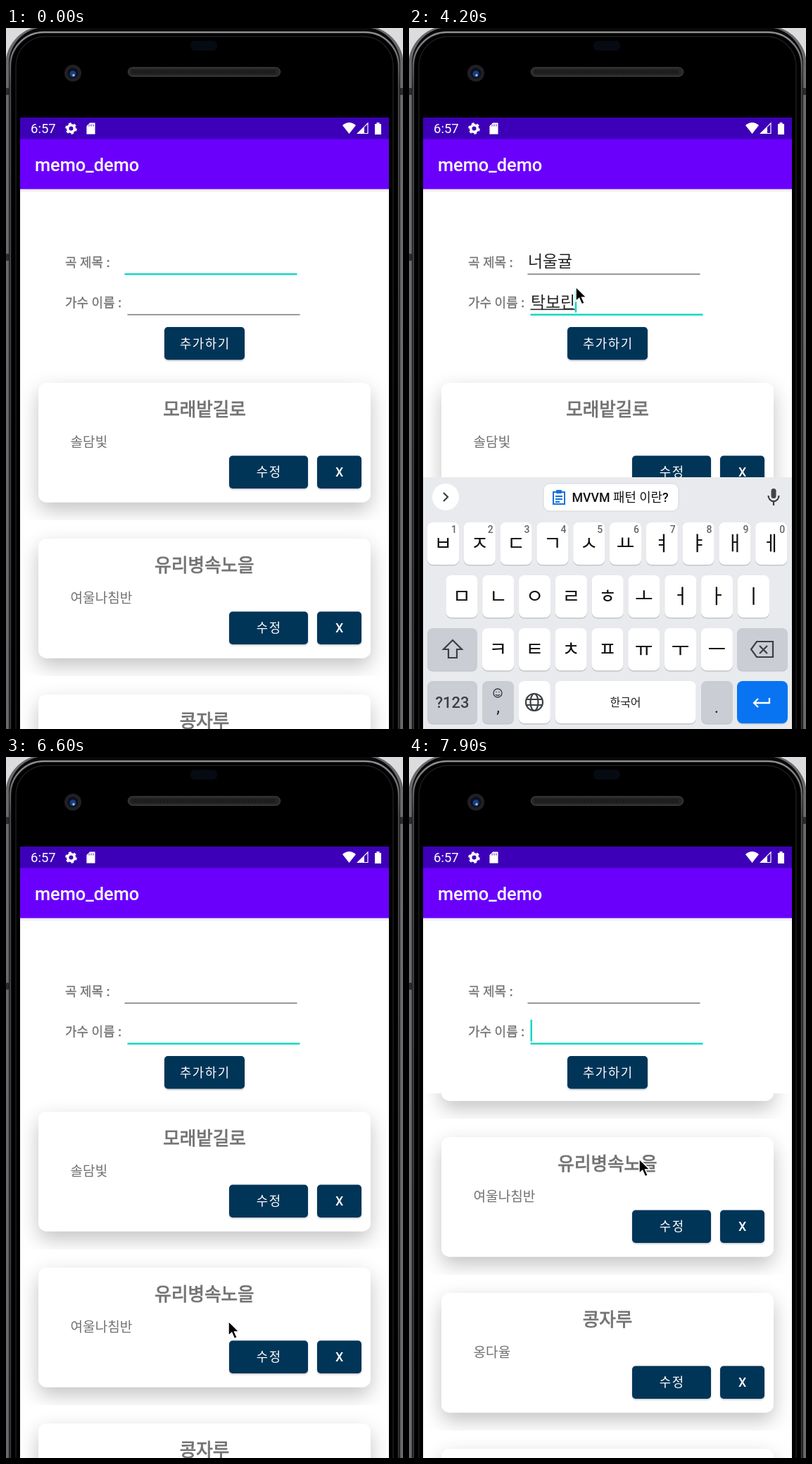
These frames come from a looping animation (564x994 px, 8000 ms). An HTML page:

```html
<!DOCTYPE html>
<html lang="ko">
<head>
<meta charset="utf-8">
<style>
html, body { margin: 0; width: 100%; height: 100%; overflow: hidden; background: #dcdcde; }
svg { display: block; }
text { font-family: Roboto, "Noto Sans CJK KR", "Noto Sans CJK", sans-serif; white-space: pre; }
.line { fill: none; stroke: #3c4043; stroke-width: 2.2; }
</style>
</head>
<body>
<svg id="stage" width="100%" height="100%" viewBox="0 0 564 994"></svg>
<script>
const LOOP = 8000, STEP = 100, ROW = 221, GLYPH = 21.07;
const NAVY = '#003459', GRAY = '#727272', TEAL = '#10d8c4';

const rect = (x, y, w, h, r, fill, more = '') =>
  `<rect x="${x}" y="${y}" width="${w}" height="${h}" rx="${r}" fill="${fill}" ${more}/>`;
// Text placed by the vertical centre of its glyphs
const text = (x, cy, size, fill, str, more = '') =>
  `<text x="${x}" y="${cy + size * .37}" font-size="${size}" fill="${fill}" ${more}>${str}</text>`;
const mid = 'text-anchor="middle"', medium = 'font-weight="500"';
const path = (d, more = 'class="line"') => `<path d="${d}" ${more}/>`;
const bold = (color, w) => `stroke="${color}" stroke-width="${w}"`;

const button = (x, y, w, h, label) =>
  rect(x, y, w, h, 5, NAVY, 'filter="url(#low)"') +
  text(x + w / 2 + .8, y + h / 2, 17.8, '#fff', label, `${mid} ${medium} letter-spacing="1.59"`);

const card = ([title, artist], i) => `<svg x="20" y="${i * ROW}" width="524" height="${ROW}">
  ${rect(0, 0, 524, ROW, 0, '#fff')}
  ${rect(26, 26, 472, 169.5, 12, '#fff', 'filter="url(#high)"')}
  ${text(262, 64, 25.6, GRAY, title, `${mid} ${bold(GRAY, .8)}`)}
  ${text(71.5, 110, 19.1, GRAY, artist)}
  ${button(297, 129.5, 112, 46.5, '수정')}${button(422, 129.5, 63, 46.5, 'X')}</svg>`;

const songs = [['모래밭길로', '솔담빛'], ['유리병속노을', '여울나침반'], ['콩자루', '옹다율'], ['너울귤', '탁보린']];

const key = (x, y, w, fill, inner = '') => rect(x, y + 1.5, w, 60, 8, '#c3c6ca') + rect(x, y, w, 60, 8, fill) + inner;
const letters = (str, x0, y, digits) => [...str].map((ch, i) => {
  const x = x0 + i * 51.8;
  return key(x, y, 45, '#fff', text(x + 22.5, y + 30, 28, '#111', ch, mid) +
    (digits ? text(x + 38, y + 10, 14, '#666', (i + 1) % 10, `${medium} ${mid}`) : ''));
}).join('');

const SOFT = '#cacdd4';
const keyboard = () => rect(20, 637, 524, 370, 0, '#e8eaed') +
  '<circle cx="52" cy="665" r="19" fill="#fff"/>' + path('M49 659l6 6-6 6') +
  `<g id="chip">${rect(191, 646, 192, 39, 9, '#fff', 'stroke="#d4d6da"')}
    ${path('M205 658h16v17h-16zM208 664h10M208 668h10M208 672h6', 'fill="none" stroke="#1470e0" stroke-width="2"')}
    ${rect(209, 655, 8, 5, 1, '#1470e0')}
    ${text(231.5, 665.5, 17.8, '#111', 'MVVM 패턴 이란?', medium)}</g>` +
  rect(514.5, 653, 7, 14, 3.5, '#444') + path('M510.500 663a7.500 8 0 0 0 15 0M518 671v6') +
  letters('ㅂㅈㄷㄱㅅㅛㅕㅑㅐㅔ', 26, 701, true) +
  letters('ㅁㄴㅇㄹㅎㅗㅓㅏㅣ', 52.5, 776) +
  letters('ㅋㅌㅊㅍㅠㅜㅡ', 104, 851) +
  key(26, 851, 71, SOFT, path('M62 868l13 13h-7v12h-12v-12h-7z')) +
  key(466, 851, 72, SOFT, path('M494 870h23v22h-23l-8-11zM498 876l11 11M509 876l-11 11')) +
  key(26, 926, 71, SOFT, text(61.5, 956, 22, '#3c4043', '?123', `${medium} ${mid}`)) +
  key(104, 926, 45, SOFT, '<circle class="line" style="stroke-width:1.4" cx="126" cy="943" r="6"/>' +
    path('M123 945q3 3 6 0M124 941v1M128 941v1', 'class="line" style="stroke-width:1.4"') +
    text(126.5, 962, 24, '#222', ',', mid)) +
  key(155.8, 926, 45, '#fff', '<circle class="line" cx="178" cy="956" r="12"/><ellipse class="line" cx="178" cy="956" rx="5.500" ry="12"/>' +
    path('M167 952h22M167 960h22')) +
  key(207.6, 926, 200, '#fff', text(307.5, 956, 16, '#222', '한국어', mid)) +
  key(415, 926, 45, SOFT, text(437, 962, 24, '#222', '.', mid)) +
  key(466, 926, 72, '#0874f2', path('M512 950v7h-21M496 951l-6 6 6 6', 'fill="none" stroke="#fff" stroke-width="2.3"'));

const field = (id, x, y) => `<path id="${id}Line" d="M${x} ${y}h245"/>` +
  text(x + .5, y - 18, 22.9, '#222', '', `id="${id}Text"`) +
  `<path id="${id}Under" stroke="#222" stroke-width="1.300"/>`;

const phone = () => rect(-1, -3, 566, 1100, 56, '#69696c') + rect(4, -1, 556, 1100, 52, '#08080a') +
  rect(6, 6, 552, 1100, 48, '#000', 'stroke="url(#rim)" stroke-width="2.500"') +
  rect(14, 12, 536, 1100, 42, '#000', 'stroke="#1d1d1f" stroke-width="1.500"') +
  [85, 320].map(y => rect(0, y, 4, 10, 1, '#2c2c2e')).join('') + rect(560, 85, 4, 10, 1, '#2c2c2e') +
  rect(262, 18, 38, 14, 6, '#060a12') +
  rect(173.5, 56, 216, 12.5, 6, '#282727', 'stroke="#4c4a48"') +
  path('M179 62.300h205', 'stroke="#111" stroke-width="6" stroke-dasharray="1 1.500"') +
  '<circle cx="95" cy="64" r="12" fill="#202024"/><circle cx="95" cy="64" r="7.500" fill="#0a1020"/>' +
  '<circle cx="95" cy="65" r="4.500" fill="#1c3f7c"/><circle cx="96" cy="67" r="1.700" fill="#9ac4f4"/>';

const bars = () => rect(20, 229, 524, 3, 0, '#f0f0f2') + rect(20, 127, 524, 31, 0, '#3d00b8') + rect(20, 157.5, 524, 71, 0, '#6a00fc') +
  text(35, 142.500, 18.5, '#fff', '6:57') +
  text(41, 194, 25.4, '#fff', 'memo_demo', medium) +
  '<circle cx="92.500" cy="142.500" r="4.800" fill="none" stroke="#fff" stroke-width="3.600"/>' +
  '<circle cx="92.500" cy="142.500" r="7" fill="none" stroke="#fff" stroke-width="2.600" stroke-dasharray="3.665"/>' +
  path('M119 134h8v17h-13v-12zM118 136.500v3M121 136.500v3M124 136.500v3', 'fill="#fff" stroke="#3d00b8" stroke-width=".9"') +
  path('M478 138q9.500-8 19 0l-9.500 12z', 'fill="#fff"') +
  path('M514 135v14.500h-14.500z', 'fill="none" stroke="#fff" stroke-width="1.200"') + path('M509 140.500v9h-9z', 'fill="#fff"') +
  path('M524 136h2.500v-2h4v2h2.500v15h-9z', 'fill="#fff"');

stage.innerHTML = `<defs>
  <filter id="high" x="-12%" y="-30%" width="124%" height="170%"><feDropShadow dx="0" dy="11" stdDeviation="14" flood-opacity=".24"/></filter>
  <filter id="low" x="-10%" y="-10%" width="120%" height="130%"><feDropShadow dx="0" dy="1.500" stdDeviation="1.200" flood-opacity=".22"/></filter>
  <linearGradient id="rim" x2="0" y2="1"><stop stop-color="#909093"/><stop offset=".07" stop-color="#444447"/><stop offset="1" stop-color="#303033"/></linearGradient>
  <clipPath id="screen">${rect(20, 127, 524, 867, 0, '#000')}</clipPath></defs>
  ${phone()}
  <g clip-path="url(#screen)">
    ${rect(20, 127, 524, 867, 0, '#fff')}
    <svg y="477" width="564" height="517"><g id="list">${songs.map(card).join('')}</g></svg>
    ${bars()}
    ${text(84, 332, 18, GRAY, '곡 제목 :', `${medium} ${bold(GRAY, .3)}`)}
    ${text(84, 389, 18, GRAY, '가수 이름 :', `${medium} ${bold(GRAY, .3)}`)}
    ${field('title', 168.5, 349)}${field('artist', 172.5, 406.5)}
    <rect id="caret" width="2.500" height="31" fill="${TEAL}"/>
    ${button(225, 424, 114, 46.5, '추가하기')}
    ${rect(225, 424, 114, 46.5, 5, '#fff', 'id="press"')}
    <circle id="glow" cx="282" r="779" fill="#6a00fc"/>
    <g id="keys">${keyboard()}</g>
  </g>
  <path id="mouse" d="M0 0v20.500l4.700-4.200 3.700 8.500 3.900-1.700-3.700-8.200h6.500z" fill="#000" stroke="#fff" stroke-width="1.500"/>`;

const el = id => document.getElementById(id);
const fade = (id, opacity) => el(id).setAttribute('opacity', +opacity);
const shift = (id, x, y) => el(id).setAttribute('transform', `translate(${x} ${y})`);

// Linear track through [time, ...values]
function at(track, t) {
  const i = track.findIndex(k => k[0] > t);
  if (i < 1) return (i ? track.at(-1) : track[0]).slice(1);
  const a = track[i - 1], b = track[i], p = (t - a[0]) / (b[0] - a[0]);
  return a.slice(1).map((v, n) => v + (b[n + 1] - v) * p);
}
const latest = (steps, t) => steps.reduce((s, [time, str]) => t >= time ? str : s, '');

const typing = {
  title: [[900, 'ㄴ'], [1100, '너'], [1300, '넝'], [1500, '너우'], [1700, '너울'], [2000, '너울ㄱ'], [2200, '너울규'], [2400, '너울귤'], [4800, '']],
  artist: [[3100, '타'], [3200, '탁'], [3400, '탁ㅂ'], [3800, '탁보'], [3900, '탁볼'], [4000, '탁보리'], [4200, '탁보린'], [4800, '']]
};
const mouseTrack = [[300, 330, 900], [600, 237, 325], [2300, 237, 325], [2400, 237, 348], [2700, 237, 367], [4300, 237, 367],
  [4600, 280, 452], [5100, 280, 452], [6200, 330, 960], [6500, 316, 800], [6600, 316, 800], [7100, 312, 430], [7300, 312, 430], [7900, 327, 570]];
const scrollTrack = [[6600, 0], [7000, 361], [7300, 361], [7900, 185]];
const keysTrack = [[700, 230, 0], [800, 60, .7], [900, 0, 1], [5700, 0, 1], [5800, 50, .8], [5900, 136, .35], [6000, 260, 0]];
const glowTrack = [[6900, 0, 0], [7100, 59, .14], [7200, 59, .14], [7500, 0, 0]];

function drawField(id, x, y, t, focused) {
  const str = latest(typing[id], t), width = str.length * GLYPH;
  el(id + 'Text').textContent = str;
  el(id + 'Under').setAttribute('d', focused && str ? `M${x} ${y - 7.5}h${width}` : '');
  el(id + 'Line').setAttribute('stroke', focused ? TEAL : '#777');
  el(id + 'Line').setAttribute('stroke-width', focused ? 2.6 : 1.3);
  if (focused) shift('caret', x + width, y - 34);
}

function draw(t) {
  const second = t >= 2600;
  drawField('title', 168.5, 349, t, !second);
  drawField('artist', 172.5, 406.5, t, second);
  fade('caret', t >= 4800 ? Math.floor((t - 4800) / 500) % 2 === 0 : (t >= 100 && t < 600) || (t >= 800 && t < 4700));
  fade('press', t >= 4700 && t < 5000 ? .2 : 0);
  shift('list', 0, -at(scrollTrack, t)[0]);

  const [drop, alpha] = at(keysTrack, t);
  shift('keys', 0, drop);
  fade('keys', alpha);
  fade('chip', t < 5800);

  const [rise, tint] = at(glowTrack, t);
  el('glow').setAttribute('cy', 994 - rise + 779);
  fade('glow', tint);

  shift('mouse', ...at(mouseTrack, t));
  fade('mouse', (t >= 300 && t < 5100) || t >= 6200);
}

const start = performance.now();
function tick() {
  const t = (performance.now() - start + 10) % LOOP;
  draw(Math.floor(t / STEP) * STEP);
  requestAnimationFrame(tick);
}
tick();
</script>
</body>
</html>
```
